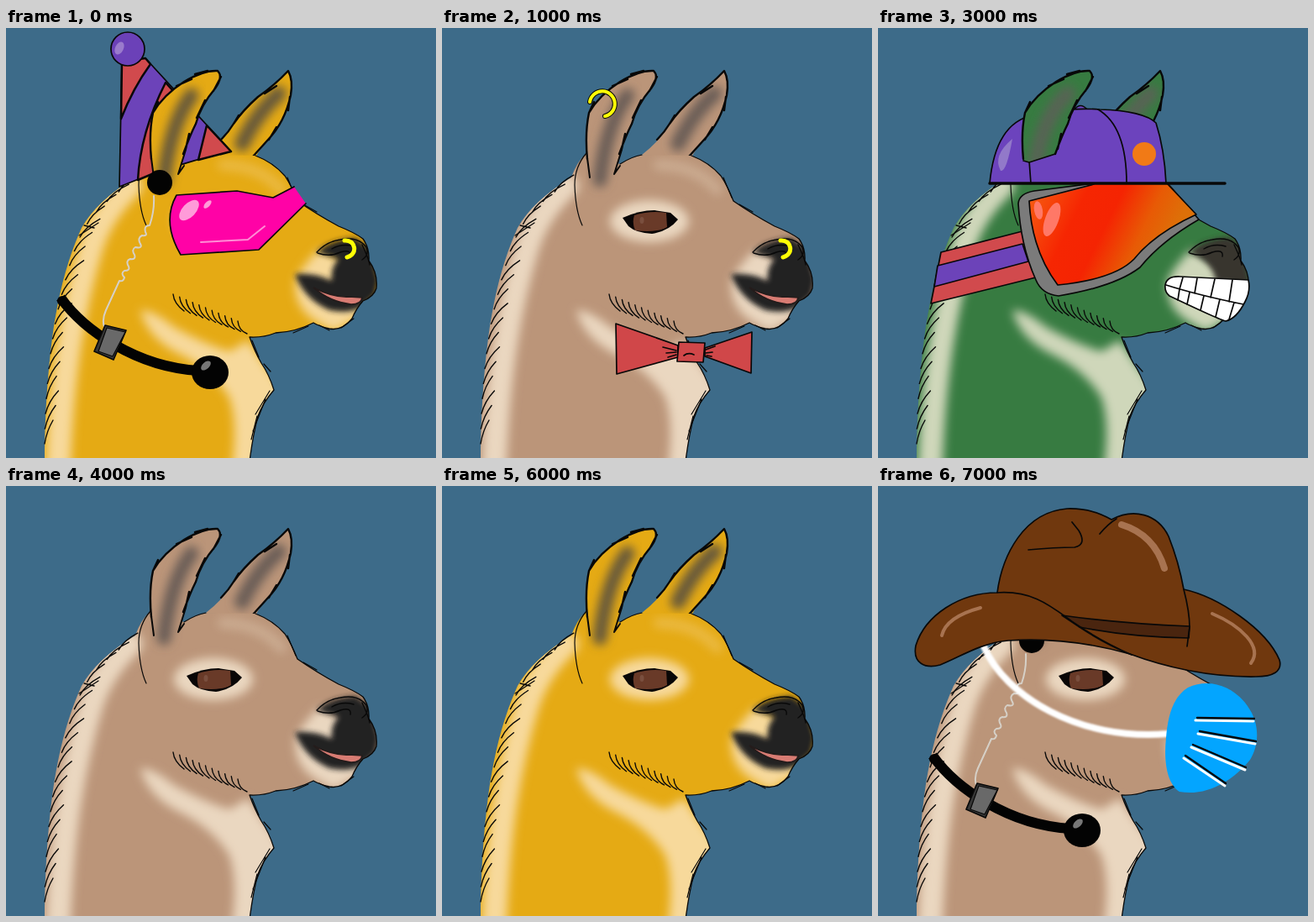
Animation of 512 by 512 pixels, one loop 8 s. Source, as an HTML page:

```html
<!DOCTYPE html>
<html lang="en">
<head>
<meta charset="utf-8">
<title>Llama dress-up</title>
<style>
html, body { margin: 0; width: 100%; height: 100%; overflow: hidden; background: #3d6b89; }
svg { display: block; width: 100vw; height: 100vh; }
.fur { fill: var(--fur); }
.patch { fill: var(--patch); }
.ln { fill: none; stroke: #080808; stroke-linecap: round; stroke-linejoin: round; }
.ol { stroke: #080808; stroke-linejoin: round; }
.round { fill: none; stroke-linecap: round; stroke-linejoin: round; }
[data-part] { display: none; }
</style>
</head>
<body>
<svg viewBox="0 0 512 512" stroke-width="1.7">
<defs>
  <filter id="b3" x="-50%" y="-50%" width="200%" height="200%"><feGaussianBlur stdDeviation="3"/></filter>
  <filter id="b6" x="-50%" y="-50%" width="200%" height="200%"><feGaussianBlur stdDeviation="6"/></filter>
  <filter id="b1" x="-20%" y="-20%" width="140%" height="140%"><feGaussianBlur stdDeviation="1"/></filter>
  <path id="body" d="M46 516C46 470 49 410 57 355C64 312 73 276 90 238Q108 206 154 178Q160 160 172 149L212 162Q226 153 240 151L297 152Q318 160 332 176Q340 188 347 206Q370 222 396 236Q416 244 425 251Q433 262 432 277Q443 292 441 310Q438 320 425 325Q417 334 412 346Q400 361 385 358Q373 355 366 351Q345 362 321 363Q306 369 290 368Q296 385 304 399Q313 412 319 431Q306 446 300 462Q294 485 290 516Z"/>
  <path id="ear" d="M173 158Q170 125 175 101Q187 80 212 64Q235 50 252 51Q259 58 249 72Q232 92 226 114Q219 128 211 150L180 160Z"/>
  <path id="farEar" d="M238 151Q262 132 271 114Q282 98 300 82Q320 68 336 51Q342 62 339 80Q332 112 312 133Q303 142 296 156Z"/>
  <clipPath id="inBody"><use href="#body"/></clipPath>
  <clipPath id="inEar"><use href="#ear"/></clipPath>
  <clipPath id="inFarEar"><use href="#farEar"/></clipPath>
  <linearGradient id="lens" gradientUnits="userSpaceOnUse" x1="180" y1="205" x2="350" y2="290">
    <stop offset="0" stop-color="#f65a10"/><stop offset=".3" stop-color="#f62602"/>
    <stop offset=".5" stop-color="#f52402"/><stop offset=".72" stop-color="#e85a05"/><stop offset=".9" stop-color="#dd7008"/>
  </linearGradient>
</defs>
<rect width="512" height="512" fill="#3d6b89"/>

<use href="#farEar" class="fur"/>
<g clip-path="url(#inFarEar)"><path d="M325 78Q299 101 281 138" class="round" stroke="var(--ear)" stroke-width="18" filter="url(#b6)"/></g>
<path class="ln" stroke-width="2.4" d="M256 133Q265 124 271 114Q282 98 300 82Q320 68 336 51Q342 62 339 80Q332 112 312 133L294 153M271 114l6-10M308 78l14-9M338 82l-2 16M322 118l-9 15"/>

<use href="#body" class="fur"/>
<g clip-path="url(#inBody)">
  <path class="round" stroke="var(--patch)" stroke-width="29" filter="url(#b6)" d="M62 530C66 410 80 330 102 258Q116 218 148 188"/>
  <path class="patch" filter="url(#b6)" d="M160 336Q176 336 200 356Q238 377 266 385L288 372L330 430L300 530H268Q277 472 266 440Q246 407 204 387Q168 368 160 336Z"/>
  <ellipse class="patch" cx="247" cy="230" rx="47" ry="25" filter="url(#b6)"/>
  <path class="round" stroke="var(--patch)" stroke-width="13" opacity=".35" filter="url(#b6)" d="M258 163Q303 164 328 193"/>
  <path class="patch" filter="url(#b6)" d="M374 263Q355 280 345 300Q341 330 367 348L390 362L420 345L425 285L398 275Z"/>
  <path data-part="dark" fill="#242220" filter="url(#b3)" d="M344 293Q368 291 388 301Q386 285 396 275L370 267Q386 252 416 250L434 263L444 300L440 318L424 332Q408 341 385 336Q355 323 344 293Z"/>
  <g data-part="grey">
    <path fill="#36332e" filter="url(#b3)" d="M371 268Q390 251 418 249L433 264L443 302L437 323Q395 316 367 305Q395 306 412 294Q419 280 395 274Z"/>
    <path class="round" stroke="#37342f" stroke-width="7" filter="url(#b3)" d="M360 308Q383 331 419 331"/>
    <path class="round" stroke="#36332e" stroke-width="3" filter="url(#b3)" d="M372 350Q390 360 412 350"/>
  </g>
  <path data-part="snout" fill="#39342f" filter="url(#b3)" d="M370 267Q390 250 420 249L435 264L444 306L402 302Q400 280 370 267Z"/>
</g>
<path class="ln" stroke-width="1.4" d="M370 267Q382 254 398 252Q420 248 429 261Q433 270 424 276M371 268Q386 273 398 267Q412 263 410 272M388 263Q400 256 414 260M424 258Q432 275 433 282"/>
<path fill="#d87c73" stroke="#241c1b" d="M366 309Q389 321 408 320L424 321Q423 329 411 329Q385 326 366 309Z"/>
<path class="ln" stroke-width="1.3" d="M297 152Q318 160 332 176Q340 188 347 206Q370 222 396 236Q416 244 425 251Q433 262 432 277Q443 292 441 310Q438 320 425 325Q417 334 412 346Q400 361 385 358Q373 355 366 351Q345 362 321 363Q306 369 290 368Q296 385 304 399Q313 412 319 431Q306 446 300 462Q294 485 290 516"/>
<path class="ln" stroke-width="1.2" d="M172 149Q158 165 158 187Q159 218 167 235M212 162Q226 153 238 151M335 178l10 24M354 210l16 9M293 372l8 20M307 400l8 9M314 432l-17 28M309 442l-15 38M299 462l-7 28M360 355l-18 8M373 354l12 6M399 357l15-11"/>
<path id="nape" fill="none" d="M47 490C48 410 57 350 68 310Q80 260 94 234Q113 203 150 180"/>
<path id="hairs" class="ln" stroke-width="1.4"/>
<path class="ln" stroke-width="1.3" d="M87 247L110 232M93 235L105 238"/>

<g data-part="eye">
  <path fill="#090606" d="M215 226Q235 217 253 217L272 220L281 228Q270 242 250 245Q231 244 222 236Z"/>
  <path fill="#693a28" d="M229 223Q248 217 267 220L268 237Q256 244 230 241Q226 232 229 223Z"/>
  <ellipse cx="238" cy="229" rx="2.5" ry="4" fill="#7a4f3e"/>
</g>

<g data-part="party">
  <path class="ol" fill="#6c43b9" d="M138 40L166 36L268 147Q200 162 135 189Z"/>
  <g fill="#d14a4d" class="ol" stroke-width="2.5">
    <path d="M138 40L166 36L172 43Q151 72 137 108Z"/>
    <path d="M190 65L211 88Q184 130 176 173L157 181Q160 124 190 65Z"/>
    <path d="M239 116L268 147L229 157Z"/>
  </g>
  <circle class="ol" cx="145" cy="25" r="20" fill="#6b41b8"/>
  <ellipse cx="135" cy="24" rx="5" ry="8" transform="rotate(25 135 24)" fill="#9a7bcc"/>
</g>

<g data-part="goggles">
  <path fill="#d14a4d" class="ol" d="M75 267L172 242L188 297L63 328Z"/>
  <path fill="#6c43b9" class="ol" d="M71 283L172 257L179 278L67 308Z"/>
  <path fill="#7b7b7b" class="ol" d="M167 209Q168 197 186 194L257 185H345L382 228Q337 254 312 285Q282 308 215 319Q195 317 188 300Q170 260 167 209Z"/>
  <path fill="url(#lens)" d="M180 206L246 190L257 185H345L379 222Q329 245 305 275Q282 299 214 306Q183 265 180 206Z"/>
  <path class="ln" d="M345 186L379 222Q329 245 305 275Q282 299 214 306Q183 265 180 206L257 186"/>
  <ellipse cx="191" cy="217" rx="5" ry="11" transform="rotate(-10 191 217)" fill="#ff7867"/>
  <ellipse cx="207" cy="228" rx="8" ry="21" transform="rotate(20 207 228)" fill="#ff7867"/>
</g>

<g data-part="cap">
  <path class="ol" fill="#6c43bd" d="M234 97Q241 88 249 97Z"/>
  <path class="ol" fill="#6c43bd" d="M133 185C137 142 151 111 184 104Q225 94 264 97C298 98 322 104 331 113Q341 144 343 185Z"/>
  <path class="ln" d="M180 158L182 185M262 97C286 111 296 143 296 185"/>
  <path class="ln" stroke-width="3.5" d="M133 185H413"/>
  <path fill="#9279c9" d="M160 132Q136 152 146 170Q153 172 160 132Z"/>
  <circle cx="317" cy="150" r="14" fill="#f17a16"/>
</g>

<path data-part="root" class="fur" d="M173 150L176 181Q190 195 206 176L213 146Z"/>
<use href="#ear" class="fur"/>
<g data-part="root">
  <path class="round" stroke="var(--ear)" stroke-width="17" filter="url(#b6)" d="M221 80Q196 113 188 181"/>
  <path class="ln" stroke-width="2" d="M173 155L176 178M214 145L205 174L212 164"/>
</g>
<g data-part="cap">
  <g clip-path="url(#inEar)"><path class="round" stroke="var(--ear)" stroke-width="18" filter="url(#b6)" d="M226 78Q197 105 188 160"/></g>
  <path class="ln" d="M173 158L180 160L211 150"/>
</g>
<path class="ln" stroke-width="2.4" d="M173 156Q170 125 175 101Q187 80 212 64Q235 50 252 51Q259 58 249 72Q232 92 226 114Q219 128 211 150M175 101l6-13M203 69l18-8M225 55l15-4M256 58l-9 17M237 86l-10 21M218 126l-4 18"/>

<g data-part="glasses">
  <path fill="#ff02a6" d="M203 199L275 194L318 202L343 189L357 209L301 264L208 270Q185 231 203 199Z"/>
  <path class="ln" d="M343 189L318 202L275 194L203 199Q185 231 208 270L301 264L357 209"/>
  <ellipse cx="218" cy="217" rx="8" ry="15" transform="rotate(43 218 217)" fill="#ff9bd9"/>
  <ellipse cx="240" cy="210" rx="3" ry="6" transform="rotate(43 240 210)" fill="#ff9bd9"/>
  <path class="round" stroke="#ff8ed5" stroke-width="2" d="M232 255L288 252L308 236"/>
</g>

<g data-part="radio">
  <circle cx="183" cy="184" r="15" fill="#030303"/>
  <path class="round" stroke="#d6d0c7" stroke-width="2" d="M176 200Q177 218 171 235q-7 0 -5 8q3 5-4 4q-6 3-2 10q3 6-6 4q-5 3-1 9q2 6-5 5q-6 2-2 9q2 5-5 5q-5 3 0 8q-1 5-6 4L119 336Q114 347 117 356"/>
  <path fill="none" stroke="#030303" stroke-width="12" d="M65 321C92 359 155 404 230 408"/>
  <circle cx="67" cy="325" r="6" fill="#030303"/>
  <ellipse cx="243" cy="410" rx="22" ry="20" fill="#030303"/>
  <ellipse cx="238" cy="402" rx="4" ry="7" transform="rotate(48 238 402)" fill="#777"/>
  <path class="ol" fill="#373737" d="M118 354L143 360L128 395L105 385Z"/>
  <path class="ol" fill="#696969" stroke-width="1.2" d="M120 357L142 362L127 391L110 385Z"/>
</g>

<g data-part="bow">
  <g class="ol" fill="#d04749">
    <path d="M207 352L281 378V392L208 412Z"/><path d="M313 381L369 362L368 411L313 391Z"/>
    <path d="M282 374L313 375L311 398L280 397Z"/>
  </g>
  <path class="ln" d="M263 380L279 384M267 387L279 386M269 392L279 389M314 383L325 379M314 387L322 386M315 390L321 391M288 390Q293 386 300 389"/>
</g>

<g data-part="earring" class="round">
  <path stroke="#080808" stroke-width="6" d="M176 88A15 15 0 1 1 194 105"/>
  <path stroke="#ffff05" stroke-width="4" d="M176 88A15 15 0 1 1 194 105"/>
</g>
<path data-part="nosering" class="round" stroke="#ffff05" stroke-width="5" d="M403 253C417 252 419 270 406 273"/>

<g data-part="teeth">
  <path class="ol" fill="#fff" d="M342 306Q344 295 360 296L441 300Q444 313 437 326Q427 346 414 349Q408 348 347 319Q341 314 342 306Z"/>
  <path class="ln" d="M343 306Q381 318 435 329M363 297L359 311M380 298L377 316M401 299L396 321M422 300L418 326M359 311L357 324M371 315L368 329M388 319L384 336M407 323L402 344M424 327L418 347"/>
</g>

<g data-part="crown">
  <path class="ol" fill="#ffe70a" d="M278 176Q303 160 311 130L320 157Q334 137 335 102Q353 130 356 160L354 181Z"/>
  <path class="round" stroke="#080808" stroke-width="8.5" d="M151 172L351 182"/>
  <path class="round" stroke="#ffe70a" stroke-width="5.5" d="M151 172L351 182"/>
  <circle class="ol" cx="338" cy="158" r="9" fill="#e70596"/>
  <path class="ln" stroke-width="1" d="M334 154H342L344 159L340 163H335L331 159ZM330 153L334 154M342 154L346 152M331 159L329 161M344 159L347 160M335 163L333 166M340 163L343 166"/>
</g>
<g data-part="marks" class="ol" fill="#275fd7" stroke-width="1.2">
  <path d="M250 182L262 207Q249 211 236 209Z"/><path d="M193 226L211 218L212 238Z"/>
  <path d="M287 221L306 231L287 240Z"/><path d="M232 257L261 258L245 299Z"/>
</g>

<g data-part="mask">
  <path class="round" stroke="#fff" stroke-width="8" filter="url(#b1)" d="M126 191C151 250 239 304 345 295"/>
  <path fill="#03a5ff" d="M369 240C395 228 424 239 440 262C455 283 454 308 443 326C423 351 391 370 359 364C344 354 340 328 343 300C345 276 350 252 369 240Z"/>
  <path class="round" stroke="#fff" stroke-width="3" d="M378 279L447 280M381 295L449 307M373 311L437 338M364 324L413 357"/>
  <path class="ln" stroke-width="2.3" d="M380 276L448 277M383 292L450 304M375 308L438 335M366 321L414 354"/>
</g>

<g data-part="cowboy">
  <path class="ol" fill="#70380e" d="M142 127C148 82 174 31 225 27Q254 26 278 40C304 26 333 33 346 60Q358 90 364 123C405 132 462 170 478 207C482 221 470 227 450 227C394 228 340 215 300 200C250 186 199 181 155 184C122 187 99 203 74 213C56 218 41 211 45 190C56 154 97 127 142 127Z"/>
  <path class="ol" fill="#4a250f" d="M219 154Q290 164 371 167L370 181Q300 180 240 168Z"/>
  <path class="ln" d="M142 127C186 124 208 145 235 164Q266 185 302 201M364 123Q371 150 371 168L368 191M240 168Q270 188 302 201M179 76Q211 73 234 73Q249 70 239 53L231 43M264 57Q274 45 284 39"/>
  <g class="round" stroke="#a87350">
    <path stroke-width="8" d="M290 46Q329 58 341 98"/><path stroke-width="4" d="M76 178Q81 156 122 145"/>
    <path stroke-width="4" d="M398 152C431 166 459 191 444 211"/>
  </g>
</g>
</svg>
<script>
const STEP = 1000;
const coats = {
  gold:  { fur: '#e5aa14', patch: '#f7d99b', ear: '#66583b' },
  tan:   { fur: '#bb9579', patch: '#ead7c0', ear: '#6b5d57' },
  black: { fur: '#282828', patch: '#beb5a9', ear: '#54514d' },
  green: { fur: '#377b41', patch: '#cfd7ba', ear: '#596355' }
};
const looks = [
  ['gold', 'dark root party glasses radio nosering'],
  ['tan', 'dark root eye earring nosering bow'],
  ['black', 'grey root eye cowboy'],
  ['green', 'snout cap goggles teeth'],
  ['tan', 'dark root eye'],
  ['black', 'grey root eye crown marks'],
  ['gold', 'dark root eye'],
  ['tan', 'dark root eye radio mask cowboy']
];

const parts = document.querySelectorAll('[data-part]');
const nape = document.getElementById('nape');

function drawHairs() {
  let d = '';
  const length = nape.getTotalLength();
  const count = 19;
  for (let i = 0; i < count; i++) {
    const p = nape.getPointAtLength(length * i / count);
    const lean = 10 + i * .7 + (i % 3) * 2;
    const rise = 28 - i * .45;
    d += `M${p.x - 1} ${p.y + 5}q${lean * .25} ${-rise * .55} ${lean} ${-rise}`;
  }
  // whiskers along the jaw
  for (let i = 0; i < 11; i++) {
    const x = 199 + i * 7.7;
    const y = 317 + i * 3.2;
    d += `M${x} ${y}q1 11 ${13 - i * .2} ${20 - i * .5}`;
  }
  document.getElementById('hairs').setAttribute('d', d);
}

function show(index) {
  const [coat, names] = looks[index];
  const worn = names.split(' ');
  for (const [key, color] of Object.entries(coats[coat])) {
    document.documentElement.style.setProperty('--' + key, color);
  }
  parts.forEach(part => {
    part.style.display = worn.includes(part.dataset.part) ? 'inline' : 'none';
  });
}

const start = performance.now();
let current = -1;
function tick() {
  const index = Math.floor((performance.now() - start) / STEP) % looks.length;
  if (index !== current) show(current = index);
  requestAnimationFrame(tick);
}
drawHairs();
tick();
</script>
</body>
</html>
```
